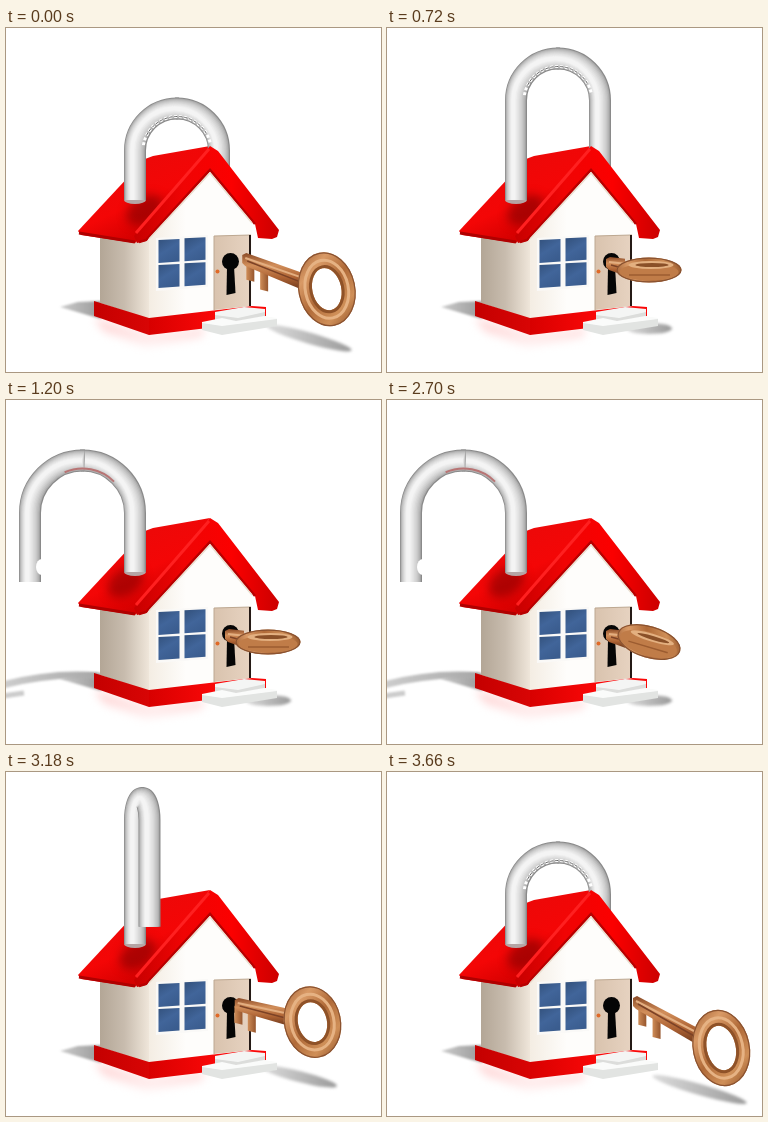
An HTML page with a canvas for the animation above (6.16 s loop, 375 by 344 pixels).

```html
<!DOCTYPE html>
<html lang="en">
<head>
<meta charset="utf-8">
<title>House lock</title>
<style>
html, body { margin: 0; width: 100%; height: 100%; overflow: hidden; background: #fff; }
canvas { display: block; width: 375px; height: 344px; }
</style>
</head>
<body>
<canvas id="stage" width="375" height="344"></canvas>
<script>
const ctx = document.getElementById('stage').getContext('2d');
const LOOP = 6160, STEP = 120, CLOSE_AT = 2700, PI = Math.PI;
const clamp = (v, lo = 0, hi = 1) => Math.max(lo, Math.min(hi, v));

function linear(x0, y0, x1, y1, ...colors) {
  const g = ctx.createLinearGradient(x0, y0, x1, y1);
  colors.forEach((c, i) => g.addColorStop(i / (colors.length - 1), c));
  return g;
}
function trace(p) {
  ctx.beginPath();
  for (let i = 0; i < p.length; i += 2) ctx.lineTo(p[i], p[i + 1]);
}
function poly(fill, ...p) {
  trace(p);
  ctx.fillStyle = fill;
  ctx.fill();
}
function line(color, width, ...p) {
  trace(p);
  ctx.strokeStyle = color;
  ctx.lineWidth = width;
  ctx.stroke();
}
function oval(fill, x, y, rx, ry, turn = 0) {
  ctx.beginPath();
  ctx.ellipse(x, y, rx, ry, turn, 0, 2 * PI);
  ctx.fillStyle = fill;
  ctx.fill();
}
function arc(color, width, x, y, rx, ry, from = 0, to = 2 * PI) {
  ctx.beginPath();
  ctx.ellipse(x, y, rx, ry, 0, from, to);
  ctx.strokeStyle = color;
  ctx.lineWidth = width;
  ctx.stroke();
}
function blurred(px, draw) {
  ctx.save();
  ctx.filter = `blur(${px}px)`;
  draw();
  ctx.restore();
}

// s runs from 0 (pulled out) to 7 (inserted and turned)
function keyPose(s) {
  const out = Math.max(0, 5 - s);
  const turned = clamp((s - 2) / 4.4) ** 2.5;
  return {
    cx: 258 + 17.5 * out - .45 * out * out + 4 * clamp(s - 5),
    cy: 242 + 34 * (Math.max(0, out - 1.5) / 3.5) ** 1.7,
    major: 32.5 + 1.2 * out,
    minor: 28.5 - 16 * turned,
    tilt: 78 * (1 - turned) * PI / 180,
    tx: 219 + 27 * (out / 5) ** 2,
    ty: 236 - out
  };
}

// q runs from 0 (closed) over 2 (lifted) to 6 (swung open)
function shacklePose(q) {
  const lift = clamp(q / 2), swing = clamp((q - 2) / 4);
  const side = Math.sin(PI * swing);
  return {
    swing,
    dx: -10.5 + 94.5 * Math.cos(PI * swing) + 25 * side * side,
    top: 80.5 - 50 * lift + 30 * swing * swing - 12 * side,
    end: 140 + 42 * swing ** 1.5
  };
}

function drawGround({ swing }, { cx, cy }) {
  blurred(1.2, () => {
    poly(linear(54, 0, 95, 0, '#ccc', '#999'), 54, 279, 72, 274, 95, 273, 95, 291);
    ctx.globalAlpha = clamp(swing * 2 - 1);
    ctx.beginPath();
    ctx.moveTo(92, 276);
    ctx.bezierCurveTo(60, 273, 28, 277, -4, 285);
    ctx.strokeStyle = linear(0, 0, 90, 0, '#ccc', '#a8a8a8');
    ctx.lineWidth = 7;
    ctx.stroke();
    line('#ccc', 5, -3, 296, 18, 293);
  });
  blurred(4, () => poly(linear(0, 295, 0, 322, '#ffd4d4', '#fffafa'),
    88, 290, 143, 306, 200, 300, 195, 310, 140, 320, 98, 304));
  const reach = Math.max(0, cx - 262), x = cx - reach * .3, half = 23 + reach * .36;
  blurred(1.6, () => oval(linear(x - half, 0, x + half, 0, '#ddd', '#bbb', '#999'),
    x, 310 + (cy - 261) * .5, half, 5.5, .28 * clamp(reach / 50)));
}

function tube(path) {
  ctx.save();
  for (let i = 0; i < 10; i++) {
    const gray = Math.round(138 + 106 * Math.sqrt(i / 9));
    ctx.strokeStyle = `rgb(${gray},${gray},${gray})`;
    ctx.lineWidth = 22 - 2 * i;
    ctx.stroke(path);
    ctx.translate(-.3, 0);
  }
  ctx.restore();
}

function drawShackle({ dx, top, end, swing }) {
  const px = 129, foot = 172, mid = px + dx / 2, rx = Math.abs(dx) / 2;
  const ry = Math.max(rx, 22), spring = top + ry, right = dx > 0;
  const leg = (x, bottom, onRight) => {
    const path = new Path2D(), overlap = onRight ? -.04 : .04;
    path.moveTo(x, bottom);
    path.lineTo(x, spring);
    path.ellipse(mid, spring, rx, ry, 0, onRight ? 0 : PI, -PI / 2 + overlap, onRight);
    tube(path);
  };
  oval('#b5a5a5', px, foot, 11, 4);
  leg(px, foot, !right);
  leg(px + dx, end, right);
  const inner = [mid, spring, Math.max(1, rx - 8), ry - 8];
  if (!swing) {
    ctx.save();
    ctx.setLineDash([3, 2]);
    arc('#fff', 3, ...inner, 3.3, 6.1);
    arc('#666', 1, ...inner, 3.6, 5.8);
    ctx.restore();
  } else if (swing === 1) {
    arc('#b87474', 2, ...inner, 4.3, 5.5);
    oval('#fff', px + dx + 12, 167, 6, 8);
  }
}

function drawWalls() {
  poly(linear(94, 0, 143, 0, '#b3a696', '#c8bcae', '#efe6da'), 94, 208, 143, 212, 143, 291, 94, 275);
  poly(linear(143, 0, 180, 0, '#f4ede3', '#fefdfb'), 143, 208, 204, 136, 246, 188, 246, 280, 143, 291);
  poly(linear(88, 0, 143, 0, '#c40000', '#d80505'), 88, 273, 143, 290, 143, 307, 88, 288);
  poly(linear(143, 0, 210, 0, '#d80000', '#fa0808'), 143, 290, 246, 278, 260, 279, 260, 288, 210, 299, 143, 307);
}

function drawWindow() {
  poly('#faf9f7', 150, 210, 202, 207, 202, 259, 150, 263);
  for (const x of [152.5, 178.5]) for (const y of [212, 237]) {
    const top = y - (x - 152) / 16;
    poly(linear(x, y, x + 14, y + 22, '#34537f', '#41659a', '#3a5c8e'),
      x, top, x + 21, top - 1, x + 21, top + 21.5, x, top + 23);
  }
}

function drawDoor() {
  poly(linear(208, 0, 245, 0, '#d9c3ae', '#e7d3c1'), 208, 208, 245, 207, 245, 278, 208, 282);
  line('#bda891', 1, 208, 282, 208, 208, 245, 207);
  line('#251a16', 2, 244, 207, 244, 278);
  oval('#e06a28', 211.5, 243.5, 2, 2);
  oval('#050505', 224.5, 233.5, 8.5, 8.5);
  poly('#050505', 221, 238, 228, 238, 229.5, 265, 220.5, 267);
}

function drawSteps() {
  poly('#f4f5f4', 209, 284, 238, 279, 259, 281, 259, 288, 230, 295, 209, 292);
  poly('#dcdddb', 209, 287, 232, 290, 259, 284, 259, 290, 232, 296, 209, 294);
  poly('#fafbfa', 196, 294, 216, 290, 230, 293, 258, 288, 271, 290, 271, 297, 216, 306, 196, 301);
  poly('#e2e4e2', 196, 295, 216, 298, 271, 291, 271, 298, 216, 307, 196, 302);
}

function drawRoofSide({ dx }) {
  const side = [72, 203, 139, 131, 147, 128, 204, 118, 140, 204, 129, 215, 75, 207];
  poly(linear(145, 132, 172, 190, '#ee0808', '#f40606', '#d40000'), ...side);
  ctx.save();
  trace(side);
  ctx.clip();
  blurred(5, () => oval('rgba(110,0,0,.5)', 130 + dx * .1, 182, 20, 13, -.6));
  ctx.restore();
  line('#b00000', 3, 73, 205, 129, 214);
}

function drawGable() {
  poly(linear(130, 0, 273, 0, '#c80000', '#f00404', '#fb0000', '#cc0000'),
    204, 118, 212, 123, 273, 202, 271, 209, 266, 211, 252, 210, 249, 196, 204, 142, 140, 213, 131, 215, 128, 208);
  line('#ff2020', 3, 130, 205, 203, 121);
  line('#b80000', 2.5, 133, 214, 140, 212, 204, 142, 249, 196);
  line('#eadfd0', 1.5, 143, 211, 204, 145, 246, 195);
}

function drawKey({ cx, cy, major, minor, tilt, tx, ty }) {
  const slope = (cy - ty) / (cx - tx);
  const ex = Math.max(tx + 16, cx - 24), ey = ty + (ex - tx) * slope;

  for (const [reach, drop] of [[2.05, 19], [1.68, 24]]) {
    const x = cx - reach * major, y = ty + (x - tx) * slope;
    if (x > 226) poly(linear(x - 4, 0, x + 5, 0, '#cf8d58', '#8f4f28'),
      x - 4, y, x + 4, y + 2, x + 4, y + drop, x - 4, y + drop - 2);
  }
  poly(linear(0, ty - 7, 0, ey + 9, '#8b4a26', '#d18e5a', '#ad6233', '#6c381c'),
    tx, ty - 5, tx + 4, ty - 7, ex, ey - 8, ex, ey + 9, tx + 3, ty + 6, tx, ty + 3);
  line('#e3ae80', 2, tx + 3, ty - 2, ex, ey - 3);
  line('#7c4226', 1.5, tx + 5, ty + 1, ex, ey + 2);

  ctx.save();
  ctx.translate(cx, cy);
  ctx.rotate(tilt);
  const hasHole = minor > 17, hx = major - 16, hy = hasHole ? minor - 14 : 2;
  ctx.beginPath();
  ctx.ellipse(0, 0, major, minor, 0, 0, 2 * PI);
  if (hasHole) {
    ctx.moveTo(hx, 0);
    ctx.ellipse(0, 0, hx, hy, 0, 0, 2 * PI);
  }
  ctx.fillStyle = linear(-major, minor, major, -minor, '#9c5a2e', '#d99a66', '#b06a38', '#cf8f58', '#8a4a20');
  ctx.fill('evenodd');
  arc('#8a5230', 1.2, 0, 0, major - .6, minor - .6);
  if (hasHole) {
    arc('#e6b283', 3, 0, 0, hx + 8, hy + 7);
    arc('#8f5228', 3, 0, 0, hx + 1.5, hy + 1.5);
  } else {
    oval('#c07c48', 0, 2, major - 3, minor - 4);
    oval('#e3b080', 2, -5, hx + 6, 4);
    oval('#8a5028', 3, -5, hx, hy);
    line('#9c5c30', 1.5, -20, 5, 21, 5);
  }
  ctx.restore();
}

function render(now) {
  const t = now % LOOP;
  const opening = t < CLOSE_AT;
  const step = Math.floor((opening ? t : t - CLOSE_AT) / STEP);
  const key = keyPose(clamp(opening ? step + 1 : 6 - step, 0, 7));
  const shackle = shacklePose(clamp(opening ? step - 4 : 8 - step, 0, 6));
  const inFront = shackle.swing > 0;

  ctx.fillStyle = '#fff';
  ctx.fillRect(0, 0, 375, 344);
  drawGround(shackle, key);
  drawWalls();
  drawWindow();
  drawDoor();
  drawSteps();
  drawRoofSide(shackle);
  if (!inFront) drawShackle(shackle);
  drawGable();
  if (inFront) drawShackle(shackle);
  drawKey(key);
}

const start = performance.now();
function tick() {
  render(performance.now() - start);
  requestAnimationFrame(tick);
}
tick();
</script>
</body>
</html>
```
